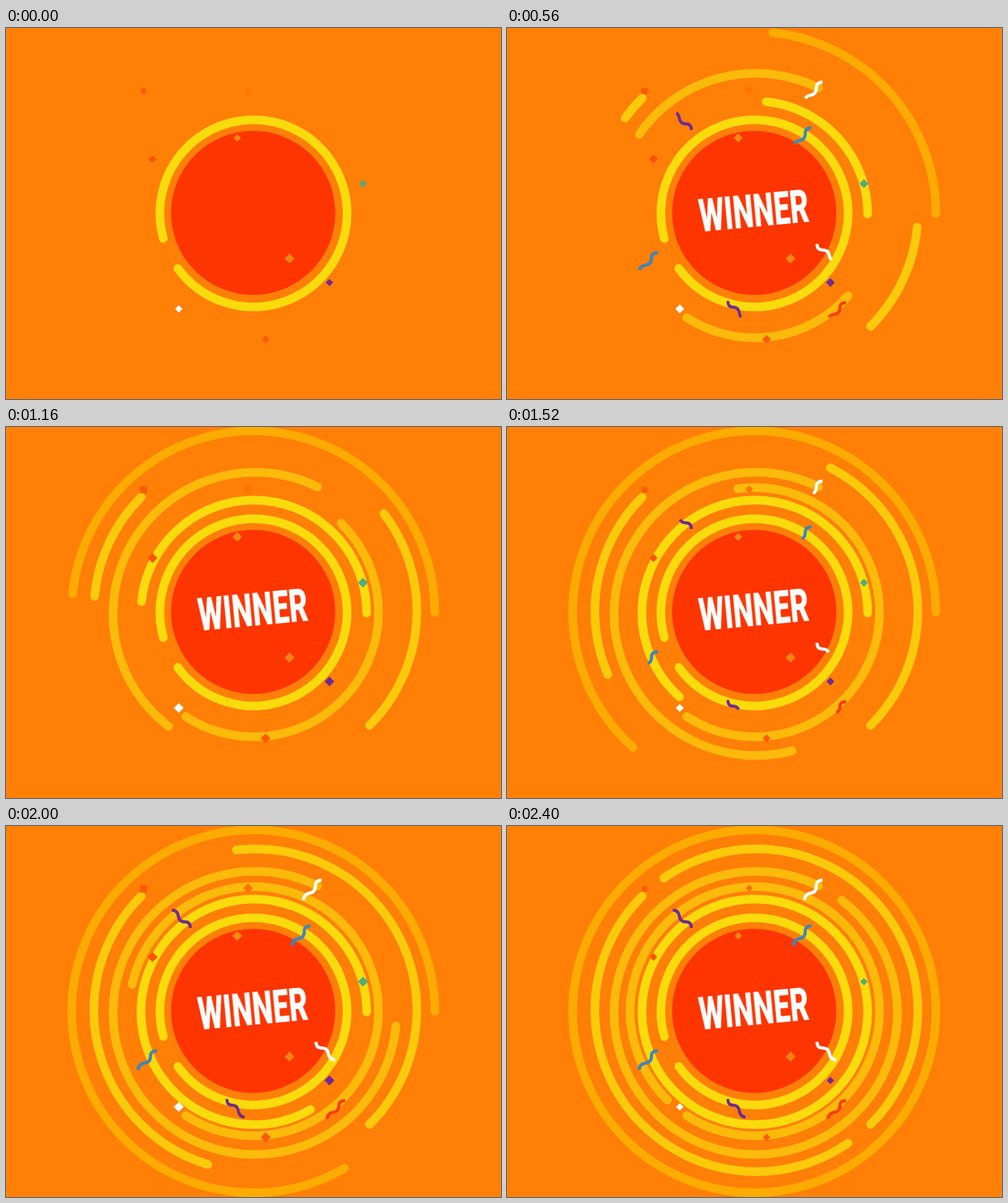
These frames come from a looping animation (800 by 600 pixels, 2.44 s). An HTML page:

```html
<!DOCTYPE html>
<html lang="en">
<head>
<meta charset="utf-8">
<title>Winner</title>
<style>
  html, body { margin: 0; height: 100%; overflow: hidden; background: #ff7f07; }
  svg { display: block; width: 100%; height: 100%; }

  .ring { fill: none; stroke-width: 14; stroke-linecap: round; }
  .arc { animation: sweep 2440ms linear infinite; }
  .arc.quad { animation-timing-function: cubic-bezier(.3333, 0, .6667, .3333); }
  @keyframes sweep {
    0% { stroke-dasharray: 0 400; }
    0%, 1% { visibility: hidden; }
    1.01%, 100% { visibility: visible; }
    98.36%, 100% { stroke-dasharray: var(--deg) 400; }
  }

  .bits rect { width: 11.4px; height: 11.4px; transform-box: fill-box; transform-origin: center; rotate: 45deg; }
  .bits .flat { rotate: 0deg; }
  .bits .pulse { animation: pulse 2440ms linear infinite; }
  @keyframes pulse {
    0%, 32.79%, 65.57%, 98.36%, 100% { scale: .74; }
    16.39%, 49.18%, 81.97% { scale: 1; }
  }

  .curls { fill: none; stroke-width: 5; }
  .curls use { animation: curl 2440ms cubic-bezier(.3333, 0, .6667, .3333) infinite; }
  .curls .slow { animation-timing-function: cubic-bezier(.3333, 0, .6667, 0); }
  .curls .even { animation-timing-function: linear; }
  @keyframes curl {
    0% { stroke-dasharray: 0 200; }
    24.59% { stroke-dasharray: 100 200; animation-timing-function: cubic-bezier(.3333, .6667, .6667, 1); }
    49.18% { stroke-dasharray: 0 200; animation-timing-function: linear; }
    72.13%, 100% { stroke-dasharray: 100 200; }
  }

  .word { font: 900 73.4px Roboto, "Liberation Sans", sans-serif; fill: #fff; text-anchor: middle; }
  .pop { animation: pop 2440ms ease-out infinite; }
  @keyframes pop {
    0%, 12.3% { transform: scale(0); }
    22%, 100% { transform: scale(1); }
  }
</style>
</head>
<body>
<svg viewBox="0 0 800 600">
  <defs>
    <path id="curl" pathLength="100" d="M0 0c0 7 3 10 9 10s10 3 11 9 4 10 11 10"/>
  </defs>

  <!-- rings, each swept anticlockwise from its start angle -->
  <g class="ring">
    <circle class="arc" r="293.5" pathLength="360" stroke="#fdab02" style="--deg:360" transform="translate(399.6 299.7) scale(1 -1)"/>
    <circle class="arc" r="261" pathLength="360" stroke="#fcca0b" style="--deg:170" transform="translate(403 298) rotate(45) scale(1 -1)"/>
    <circle class="arc quad" r="261" pathLength="360" stroke="#fcca0b" style="--deg:169.6" transform="translate(403 298) rotate(225) scale(1 -1)"/>
    <circle class="arc" r="229" pathLength="360" stroke="#fdba0a" style="--deg:349" transform="translate(402 302.3) rotate(-63.7) scale(1 -1)"/>
    <circle class="arc" r="201.5" pathLength="360" stroke="#fdba0a" style="--deg:348.6" transform="translate(400.5 299.5) rotate(123.1) scale(1 -1)"/>
    <circle class="arc" r="182.4" pathLength="360" stroke="#fbdb0c" style="--deg:360" transform="translate(400.5 300.7) scale(1 -1)"/>
    <circle r="151.3" pathLength="360" stroke="#fbdb0c" stroke-dasharray="339.5 400" transform="translate(400 299.7) rotate(164.4)"/>
  </g>
  <circle cx="399.5" cy="299" r="132.7" fill="#ff3500"/>

  <g class="bits">
    <rect class="pulse flat" x="216.6" y="96.1" fill="#ff5a05"/>
    <rect class="pulse" x="385.6" y="95.1" fill="#ff7304"/>
    <rect class="pulse" x="231.1" y="206.3" fill="#ff5005"/>
    <rect class="pulse" x="368" y="172" fill="#fb8a12"/>
    <rect class="pulse" x="571.2" y="246.1" fill="#4bae7f"/>
    <rect x="452.6" y="367.2" fill="#f68310"/>
    <rect class="pulse" x="517" y="405.9" fill="#702c91"/>
    <rect class="pulse" x="273.5" y="448.6" fill="#fff"/>
    <rect class="pulse" x="413.8" y="497.8" fill="#ff5a05"/>
  </g>

  <g class="curls">
    <use href="#curl" stroke="#fff" transform="translate(510 87.5) rotate(90) scale(1.05 1)"/>
    <use href="#curl" stroke="#3f87b8" transform="translate(492 161.5) rotate(90) scale(1.03 1)"/>
    <use href="#curl" stroke="#702c91" transform="translate(298 165) rotate(180) scale(.97 1)"/>
    <use href="#curl" class="even" stroke="#3f87b8" transform="translate(244 363.5) rotate(90) scale(1 1.05)"/>
    <use href="#curl" class="slow" stroke="#702c91" transform="translate(357 441.5) scale(.92 1)"/>
    <use href="#curl" class="slow" stroke="#fff" transform="translate(501 349)"/>
    <use href="#curl" stroke="#ff3a05" transform="translate(548 444) rotate(90) scale(.95 1)"/>
  </g>

  <g transform="translate(399 295.5) rotate(-5.35)">
    <g class="pop"><text class="word" y="26.1" transform="scale(.64 1)">WINNER</text></g>
  </g>
</svg>
</body>
</html>
```
